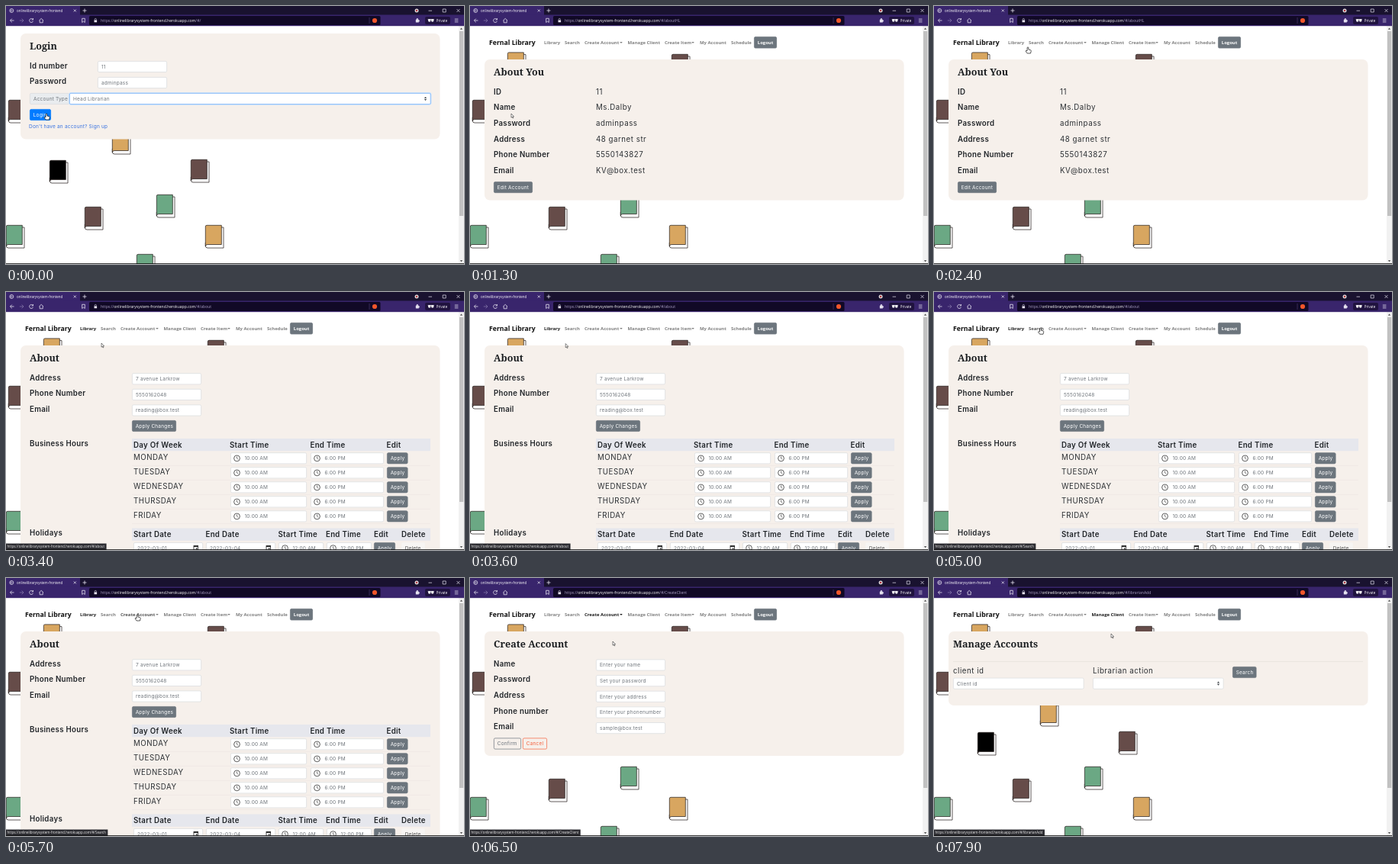
An HTML page for the animation above (8000 ms loop, 600x338 px).

```html
<!DOCTYPE html>
<html lang="en">
<head>
<meta charset="utf-8">
<title>Library system demo</title>
<style>
html, body { margin: 0; width: 100%; height: 100%; overflow: hidden; background: #fff; }
svg { display: block; width: 600px; height: 338px; }
text { white-space: pre; }
.b { font: 600 9.7px Inter, sans-serif; fill: #212529; letter-spacing: .03em; }
.v { font: 400 9.7px Inter, sans-serif; fill: #2c3034; letter-spacing: .055em; }
.s { font: 400 6.5px Inter, sans-serif; fill: #70767c; letter-spacing: .03em; }
.h { font: 700 12.6px "Noto Serif", serif; fill: #1c1f22; }
.n { font: 700 5.95px "Open Sans", "Noto Sans", sans-serif; fill: #7f7f7f; }
.brand { font: 700 8.7px "Open Sans", "Noto Sans", sans-serif; fill: #111; }
.u { font: 400 5.05px "Open Sans", "Noto Sans", sans-serif; fill: #a99fc4; }
.t { font: 400 4.45px "Open Sans", "Noto Sans", sans-serif; fill: #eee; }
</style>
</head>
<body>
<svg id="stage" viewBox="0 0 600 338" xmlns="http://www.w3.org/2000/svg"></svg>
<script>
const LOOP = 8000, STEP = 100;
const HOST = 'onlinelibrarysystem-frontend.herokuapp.com';
const GREY = '#6c757d', BLUE = '#007bff', LINE = '#d9dbde';

// Drawing helpers
const text = (cls, x, y, s, fill) =>
  `<text class="${cls}" x="${x}" y="${y}"${fill ? ` style="fill:${fill}"` : ''}>${s}</text>`;
const rect = (x, y, w, h, fill, extra = '') =>
  `<rect x="${x}" y="${y}" width="${w}" height="${h}" fill="${fill}" ${extra}/>`;
const line = (d, color, w = .7) =>
  `<path d="${d}" fill="none" stroke="${color}" stroke-width="${w}"/>`;
const box = (x, y, w, h = 15, fill = '#fff', stroke = LINE) =>
  rect(x + .4, y + .4, w - .8, h - .8, fill, `rx="1.6" stroke="${stroke}" stroke-width=".7"`);
const card = (y, h) => rect(19, y, 549.5, h, '#f6f0eb', 'rx="7"');
const button = (x, y, w, s, fill = GREY, color = '#fff', stroke = fill) =>
  box(x, y, w, 15, fill, stroke) + text('s', x + 4.7, y + 9.9, s, color);
const field = (x, y, w, s) => box(x, y, w) + text('s', x + 5, y + 9.9, s);
const clock = (x, y) =>
  `<circle cx="${x}" cy="${y}" r="3.9" fill="none" stroke="#333" stroke-width=".8"/>` +
  line(`M${x} ${y - 2.4}V${y}L${x + 1.7} ${y + 1.4}`, '#333');
const time = (x, y, w, s) =>
  box(x, y, w) + clock(x + 8.5, y + 7.6) + text('s', x + 18.5, y + 9.9, s);
const date = (x, y, w, s) => field(x, y, w, s) +
  rect(x + w - 12, y + 4.4, 5.6, 5.6, 'none', 'stroke="#222" stroke-width=".8"') +
  rect(x + w - 12, y + 4, 5.6, 1.9, '#222') + rect(x + w - 9.2, y + 7.3, 1.6, 1.6, '#222');
const arrows = (x, y) =>
  `<path d="M${x - 1.6} ${y - .6}h3.2l-1.6-2zM${x - 1.6} ${y + .6}h3.2l-1.6 2z" fill="#343a40"/>`;
const rows = (list, y, pitch, draw) => list.map((s, i) => draw(s, y + i * pitch)).join('');
const labels = list => rows(list, 115.6, 20.7, (s, y) => text('b', 31, y, s));

const book = ([x, y, c]) => `<g transform="translate(${x} ${y})" stroke="#2b2523" stroke-width=".75">
  <path d="M3 3H24V30H3Q.3 30 .3 27V23H3Z" fill="#fff"/>
  <path d="M2 .3H21.3V25.5H3Q.3 25.5 .3 28V2Q.3 .3 2 .3Z" fill="${c}"/></g>`;

const BROWN = '#664c49', GREEN = '#6ba884', GOLD = '#d8a660';
const books = [
  [49, 60.6, GOLD], [264, 63, BROWN], [3, 123, BROWN], [139, 164, GOLD], [57, 202, '#000'],
  [242, 201, BROWN], [197, 247, GREEN], [103, 263, BROWN], [261, 287, GOLD], [0, 287, GREEN],
  [171, 325, GREEN], [79, 352, '#000'], [217, 379.5, BROWN]
].map(book).join('');

// Pages
const links = [
  ['Library', 97], ['Search', 124], ['Create Account', 150, 198], ['Manage Client', 206.5],
  ['Create Item', 255, 292], ['My Account', 301], ['Schedule', 342]
];
const nav = active => text('brand', 25, 51.3, 'Fernal Library') +
  links.map(([s, x, caret]) => {
    const color = s === active ? '#1c1c1c' : '#7f7f7f';
    return `<g data-link="${s}">${text('n', x, 50.2, s, color)}</g>` +
      (caret ? `<path d="M${caret - 1.8} 47h3.6l-1.8 2z" fill="${color}"/>` : '');
  }).join('') +
  box(372, 40, 30, 15.5, GREY, GREY) + text('n', 376.8, 50.2, 'Logout', '#fff');

const login = focused => card(36, 138.5) + text('h', 31, 56.7, 'Login') +
  text('b', 31, 81.5, 'Id number') + text('b', 31, 102.3, 'Password') +
  field(120, 72, 91, '11') + field(120, 93, 91, 'adminpass') +
  box(31, 114, 52, 15, '#e9ecef') + text('s', 36, 123.9, 'Account Type') +
  (focused ? rect(82.3, 113.3, 475, 16.4, '#bfdeff', 'rx="2.4"') : '') +
  box(83, 114, 473.5, 15, '#fff', focused ? '#73aef5' : LINE) +
  text('s', 88, 123.9, 'Head Librarian') + arrows(549.5, 121.5) +
  button(31, 135, 28, 'Login', BLUE) +
  text('s', 30, 159.6, 'Don\'t have an account? Sign up', '#3973e0');

const profile = nav() + card(70, 184.5) + text('h', 31, 91, 'About You') +
  labels(['ID', 'Name', 'Password', 'Address', 'Phone Number', 'Email']) +
  rows(['11', 'Ms.Dalby', 'adminpass', '48 garnet str', '5550143827', 'KV@box.test'],
    115.6, 20.7, (s, y) => text('v', 165, y, s)) +
  button(31, 230, 51, 'Edit Account');

const heads = (y, list) => rect(165, y, 391, 16.3, '#e6e7ed') +
  list.map(([s, x]) => text('b', x, y + 11.6, s)).join('');

const about = nav('Library') + card(70, 305) + text('h', 31, 91, 'About') +
  labels(['Address', 'Phone Number', 'Email']) +
  rows(['7 avenue Larkrow', '5550162048', 'reading@box.test'], 106.3, 20.6,
    (s, y) => field(165, y, 91, s)) +
  button(165, 168, 58, 'Apply Changes') + text('b', 31, 201.5, 'Business Hours') +
  heads(192, [['Day Of Week', 167], ['Start Time', 293], ['End Time', 398.5], ['Edit', 498.5]]) +
  rows(['MONDAY', 'TUESDAY', 'WEDNESDAY', 'THURSDAY', 'FRIDAY'], 210.3, 19, (s, y) =>
    text('v', 167, y + 9.5, s) + time(294, y, 100, '10:00 AM') + time(399, y, 96, '6:00 PM') +
    button(499, y, 27.5, 'Apply') + line(`M165 ${y + 17}H556`, '#e6e0dc', .5)) +
  text('b', 31, 318.5, 'Holidays') +
  heads(309.5, [['Start Date', 167], ['End Date', 261.5], ['Start Time', 356.5],
    ['End Time', 419], ['Edit', 482], ['Delete', 518]]) +
  date(167, 328, 91, '2022-03-01') + date(262, 328, 91, '2022-03-04') +
  time(357, 328, 59, '12:00 AM') + time(420, 328, 59, '12:00 PM') +
  button(482, 328, 28, 'Apply') + button(518, 328, 31, 'Delete', '#f7f5f3', '#555') +
  date(165, 351, 80, 'yyyy-mm-dd') + date(249, 351, 80, 'yyyy-mm-dd') +
  time(333, 351, 76, 'No time selected') + time(412.5, 351, 77, 'No time selected') +
  button(492.5, 351, 25, 'Save', BLUE);

const create = nav('Create Account') + card(70, 163) + text('h', 31, 91, 'Create Account') +
  labels(['Name', 'Password', 'Address', 'Phone number', 'Email']) +
  rows(['Enter your name', 'Set your password', 'Enter your address',
    'Enter your phonenumber', 'sample@box.test'], 106.5, 20.65,
    (s, y) => field(165, y, 91, s)) +
  button(31, 209.5, 36, 'Confirm', 'none', GREY, GREY) +
  button(69, 209.5, 32, 'Cancel', 'none', '#f4603c', '#f4603c');

const manage = nav('Manage Client') + card(70, 97) + text('h', 25, 91, 'Manage Accounts') +
  line('M25 109.4H562', '#e3dcd7', .6) +
  text('v', 25, 125.2, 'client id') + text('v', 208, 125.2, 'Librarian action') +
  field(25, 130.7, 171.5, 'Client id') + box(208, 130.7, 171.5) + arrows(372.5, 138.2) +
  button(391, 116, 31.5, 'Search');

// Browser frame
const scrollbar = rect(593, 26, 7, 312, '#f1f1f1') +
  '<path d="M594.8 30.7h3.4l-1.7-2.2zM594.8 333h3.4l-1.7 2.2z" fill="#555"/>' +
  rect(594, 33, 5.2, 242, '#c1c1c1', 'id="thumb"');
const pale = '#e6e2f0';
const icon = (d, w = .8) => line(d, pale, w);
const dot = (x, y, r, fill) => `<circle cx="${x}" cy="${y}" r="${r}" fill="${fill}"/>`;
const chrome = rect(0, 0, 600, 12, '#19122f') + rect(0, 0, 97, 12, '#39256c') +
  rect(0, 11.5, 600, 14.7, '#39256c') + rect(109, 13, 381.5, 12, '#110926', 'rx="1.5"') +
  '<circle cx="7.3" cy="6" r="2.5" fill="none" stroke="#d9d5e5" stroke-width=".8"/>' +
  icon('M5 6h4.6M7.3 3.6q-1.6 2.4 0 4.8', .5) +
  text('t', 14, 7.8, 'onlinelibrarysystem-frontend', '#fff') +
  icon('M88.8 4.5l3 3m0-3l-3 3M100.5 6h5M103 3.5v5') +
  dot(538, 6, 2.5, '#ddd') + dot(538, 6, 1.2, '#b0323c') +
  icon('M553.5 6.2h4.5M572.2 4h4v4h-4zM590.5 4l4 4m0-4l-4 4', .7) +
  icon('M10.5 19H5.6m2.2-2.4L5.4 19l2.4 2.4') +
  line('M17.8 19h5m-2.2-2.4L23 19l-2.4 2.4', '#8b7fb0') +
  icon('M35.2 17.6a2.5 2.5 0 1 0 .3 2.2M35.5 16v2h-2') +
  icon('M43.4 19l2.8-2.6 2.8 2.6M44.2 18.6v3.2h4v-3.2') +
  icon('M99.7 16.3h3.6v5.2l-1.8-1.4-1.8 1.4z') +
  rect(115.5, 18.5, 3.6, 2.8, pale) + icon('M116.2 18.5v-1a1.1 1.1 0 0 1 2.2 0v1', .6) +
  line('M476 15v8', '#51417f', .6) + dot(483, 19, 3.1, '#f0562b') +
  rect(536.8, 17.5, 4, 4, pale, 'rx=".6"') + dot(538.8, 17.1, 1, pale) + dot(541, 19.5, .9, pale) +
  rect(549, 14, 33, 10, '#20133f', 'rx="2"') +
  dot(554.7, 19, 1.7, '#fff') + dot(558.7, 19, 1.7, '#fff') +
  rect(552.7, 17.2, 8, 1, '#fff') + text('t', 563.8, 20.6, 'Private', '#fff') +
  icon('M587.8 17h4.6m-4.6 2h4.6m-4.6 2h4.6', .7) +
  `<text class="u" x="124" y="20.9">https://<tspan fill="#fff">${HOST}</tspan><tspan id="path"></tspan></text>`;

const hand = '<path d="M-.9 .4Q0-.6 .9 .4V3L3.7 3.8Q4.5 4.1 4.2 5.2L3.5 8H-.9L-3 5Q-2.5 3.7-.9 4.8Z" fill="#fff" stroke="#111" stroke-width=".7"/>';
const arrow = '<path d="M0 0V5.2L1.2 4.1L2 6L2.9 5.6L2.1 3.8H3.6Z" fill="#fff" stroke="#333" stroke-width=".6"/>';

const stage = document.getElementById('stage');
stage.innerHTML = rect(0, 0, 600, 338, '#fff') +
  `<g id="view">${books}<g id="page"></g></g>` + scrollbar + chrome +
  `<g id="status">${rect(0, 329.5, 0, 8.5, '#2b2b30', 'id="tip"')}<text class="t" id="tipText" x="1.6" y="335"></text></g>` +
  rect(0, 337.2, 600, .8, '#111') + '<g id="cursor"></g>';

// Timeline: [start ms, value ...]
const pages = [
  [0, login(true), ''], [100, login(false), ''], [1200, profile, 'aboutHL'],
  [3000, about, 'about'], [6200, create, 'CreateClient'], [7400, manage, 'librarianAdd']
];
const tips = [
  [0, ''], [2800, 'about'], [3700, ''], [4800, 'Search'], [5800, 'CreateClient'],
  [6800, ''], [7200, 'librarianAdd']
];
const hovers = [
  [0, ''], [2700, 'Library'], [3100, ''], [4800, 'Search'], [5300, 'Create Account'],
  [5800, ''], [7100, 'Manage Client'], [7500, '']
];
const cursors = [
  [0, hand], [1200, arrow], [2200, hand], [3200, arrow], [4800, hand], [6300, arrow],
  [7100, hand], [7500, arrow]
];
const moves = [
  [0, 53, 141], [1400, 54, 141], [2200, 121, 58], [2400, 123, 54], [2800, 111, 49],
  [3000, 111, 49], [3400, 125, 67], [4100, 126, 70], [4500, 126, 70], [4800, 138, 48],
  [5100, 140, 47], [5500, 172, 47], [5700, 172, 48], [6000, 185, 80], [6500, 187, 83],
  [6700, 190, 80], [7100, 225, 48], [7400, 226, 48], [7800, 232, 73]
];
const scrolls = [[0, 0], [3650, 0], [4000, 72], [4400, 72], [4750, 0]];

const held = (track, t) => track.filter(k => k[0] <= t).pop();
function eased(track, t) {
  const a = held(track, t), b = track[track.indexOf(a) + 1];
  if (!b) return a.slice(1);
  const p = (t - a[0]) / (b[0] - a[0]), e = p * p * (3 - 2 * p);
  return a.slice(1).map((v, i) => v + (b[i + 1] - v) * e);
}

const el = id => document.getElementById(id);
const shown = {};
function change(key, value, apply) {
  if (shown[key] === value) return;
  shown[key] = value;
  apply(value);
}

function draw(t) {
  change('page', held(pages, t), ([, body, path]) => {
    el('page').innerHTML = body;
    el('path').textContent = '/#/' + path;
    shown.hover = null;
  });
  change('hover', held(hovers, t)[1], name => {
    for (const g of document.querySelectorAll('[data-link]'))
      g.style.filter = g.dataset.link === name ? 'brightness(.65)' : '';
  });
  change('tip', held(tips, t)[1], path => {
    el('status').style.display = path ? '' : 'none';
    el('tipText').textContent = `https://${HOST}/#/${path}`;
    if (path) el('tip').setAttribute('width', el('tipText').getComputedTextLength() + 4);
  });
  change('cursor', held(cursors, t)[1], shape => { el('cursor').innerHTML = shape; });
  const [x, y] = eased(moves, t), [top] = eased(scrolls, t);
  el('cursor').setAttribute('transform', `translate(${x} ${y})`);
  el('view').setAttribute('transform', `translate(0 ${-top})`);
  el('thumb').setAttribute('y', 33 + top * 55 / 72);
}

const start = performance.now();
function tick() {
  const t = (performance.now() - start) % LOOP;
  draw(Math.floor(t / STEP) * STEP);
  requestAnimationFrame(tick);
}
tick();
</script>
</body>
</html>
```
